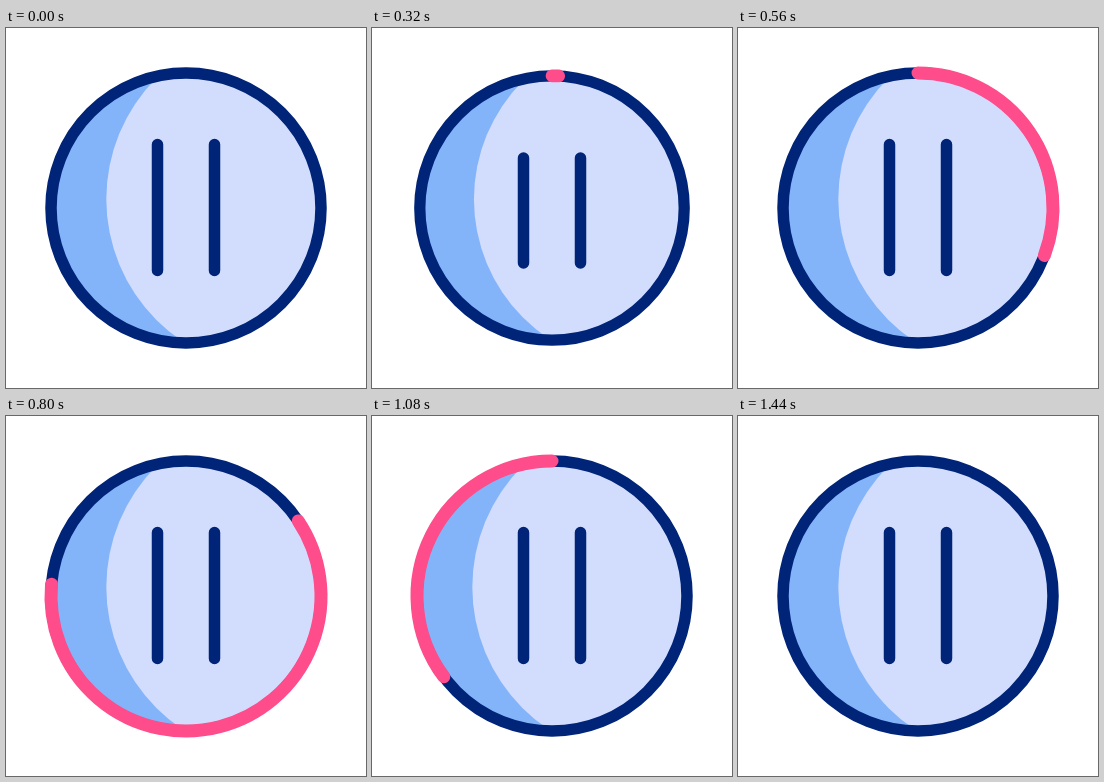
Animation of 360x360 px, one loop 1480 ms. Source, as an HTML page:

```html
<!DOCTYPE html>
<html lang="en">
<head>
<meta charset="utf-8">
<title>Pause button</title>
<style>
  html, body { margin: 0; width: 100%; height: 100%; overflow: hidden; background: #fff; }
  svg { display: block; width: 100%; height: 100%; }
  .line { fill: none; stroke: #002478; stroke-width: 11.5; stroke-linecap: round; }
  #arc { stroke: #ff4c8b; stroke-width: 13; }
</style>
</head>
<body>
<svg viewBox="0 0 360 360">
  <clipPath id="disc"><circle cx="180" cy="180" r="135"/></clipPath>
  <g id="button">
    <circle cx="180" cy="180" r="135" fill="#83b3f9"/>
    <circle cx="271.3" cy="171" r="171" fill="#d2ddfd" clip-path="url(#disc)"/>
    <circle class="line" cx="180" cy="180" r="135"/>
    <path class="line" id="arc"/>
  </g>
  <path class="line" id="bars"/>
</svg>
<script>
  const LOOP = 1480, STEP = 40, R = 135;
  const [button, arc, bars] = ['button', 'arc', 'bars'].map(id => document.getElementById(id));

  // Eased progress from 0 to 1 between two times
  const ease = (t, from, to) => {
    const s = Math.min(1, Math.max(0, (t - from) / (to - from)));
    return s * s * (3 - 2 * s);
  };

  const rim = turn => {
    const a = turn * 2 * Math.PI;
    return `${180 + R * Math.sin(a)} ${180 - R * Math.cos(a)}`;
  };

  function draw(t) {
    const press = ease(t, 120, 280) - ease(t, 280, 440);
    const scale = 1 - 0.0245 * press;
    button.setAttribute('transform', `translate(180 180) scale(${scale}) translate(-180 -180)`);

    const top = 116.5 + 16 * press, bottom = 242.5 - 9 * press;
    bars.setAttribute('d', `M151.5 ${top}V${bottom}M208.5 ${top}V${bottom}`);

    const head = ease(t, 280, 1040), tail = ease(t, 600, 1400);
    const large = head - tail > 0.5 ? 1 : 0;
    arc.setAttribute('d', head > tail
      ? `M${rim(tail)}A${R} ${R} 0 ${large} 1 ${rim(head)}` : '');
  }

  const start = performance.now();
  function tick() {
    const t = (performance.now() - start) % LOOP;
    draw(Math.floor(t / STEP) * STEP);
    requestAnimationFrame(tick);
  }
  draw(0);
  requestAnimationFrame(tick);
</script>
</body>
</html>
```
